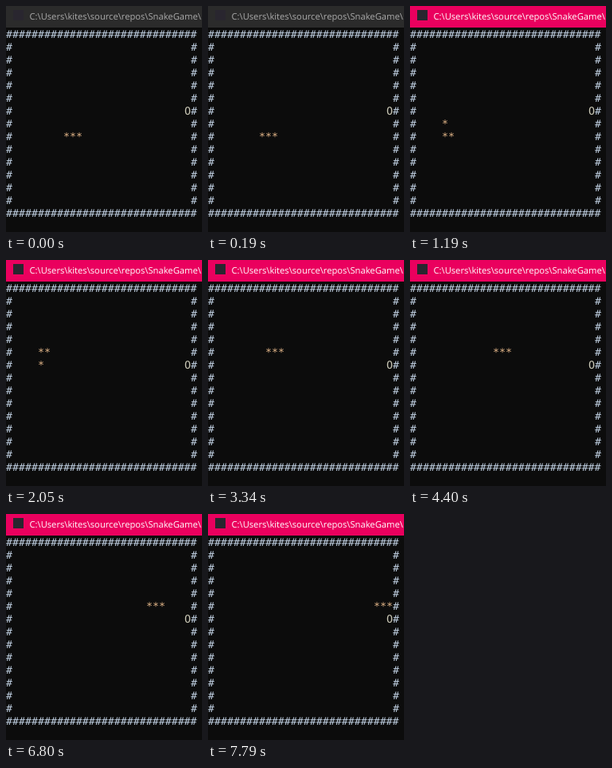
An HTML page for the animation above (8 s loop, 246 by 283 pixels).

```html
<!DOCTYPE html>
<html lang="en">
<head>
<meta charset="utf-8">
<title>Snake</title>
<style>
  html, body { margin: 0; width: 100%; height: 100%; overflow: hidden; background: #0c0c0c; }
  svg { display: block; width: 246px; height: 283px; }
  text { white-space: pre; text-rendering: geometricPrecision; }
  .cell { font: 13.288px "DejaVu Sans Mono", monospace; }
  .wall { fill: #c0d0e2; }
  .snake { fill: #e2b588; }
  .food { fill: #cccab8; }
  .title { font: 11.2px "Open Sans", sans-serif; }
</style>
</head>
<body>
<svg id="stage" viewBox="0 0 246 283">
  <rect width="246" height="283" fill="#0c0c0c"/>
  <rect id="bar" width="246" height="27"/>
  <rect x="9" y="5" width="13" height="13" fill="#29262f"/>
  <text id="caption" class="title" x="29.5" y="16.5">C:\Users\kites\source\repos\SnakeGame\</text>
</svg>
<script>
const LOOP = 8000, CELL_W = 8, CELL_H = 16, BASELINE = 40;
const COLS = 30, ROWS = 15, LENGTH = 3;
const FOCUS_TIME = 260;

// Moments at which the snake's head advances one cell.
const MOVES = [
  190, 390, 670, 930, 1190, 1460, 1730, 2050, 2310, 2580,
  2860, 3070, 3340, 3600, 3870, 4190, 4400, 4730, 5000, 5270,
  5530, 5790, 5990, 6270, 6530, 6800, 7070, 7330, 7600, 7790
];
// On slow moves the tail is erased shortly before the head is drawn.
const SLOW_MOVES = [2050, 4190, 4730];
const ERASE_LEAD = 60;

const stage = document.getElementById("stage");
const bar = document.getElementById("bar");
const caption = document.getElementById("caption");

function place(node, col, row) {
  node.setAttribute("x", col * CELL_W);
  node.setAttribute("y", BASELINE + row * CELL_H);
}

function addText(content, kind, col, row) {
  const node = document.createElementNS("http://www.w3.org/2000/svg", "text");
  node.setAttribute("class", "cell " + kind);
  node.textContent = content;
  place(node, col, row);
  return stage.appendChild(node);
}

for (let row = 0; row < ROWS; row++) {
  if (row === 0 || row === ROWS - 1) {
    addText("#".repeat(COLS), "wall", 0, row);
  } else {
    addText("#", "wall", 0, row);
    addText("#", "wall", COLS - 1, row);
  }
}
addText("O", "food", 28, 6);
const segments = Array.from({ length: LENGTH }, () => addText("*", "snake", 0, 0));

// Left along row 8, up column 5, then right along row 5.
function pathCell(i) {
  if (i <= 6) return [11 - i, 8];
  if (i <= 9) return [5, 14 - i];
  return [i - 4, 5];
}

function render(t) {
  const focused = t >= FOCUS_TIME;
  bar.setAttribute("fill", focused ? "#ea005e" : "#2b2b2b");
  caption.setAttribute("fill", focused ? "#ffffff" : "#aaaaaa");

  const tail = MOVES.filter(time => time <= t).length;
  const erasing = SLOW_MOVES.some(time => t >= time - ERASE_LEAD && t < time);
  segments.forEach((node, i) => {
    place(node, ...pathCell(tail + i));
    node.setAttribute("visibility", i === 0 && erasing ? "hidden" : "visible");
  });
}

const start = performance.now();
function tick() {
  render((performance.now() - start) % LOOP);
  requestAnimationFrame(tick);
}
tick();
</script>
</body>
</html>
```
